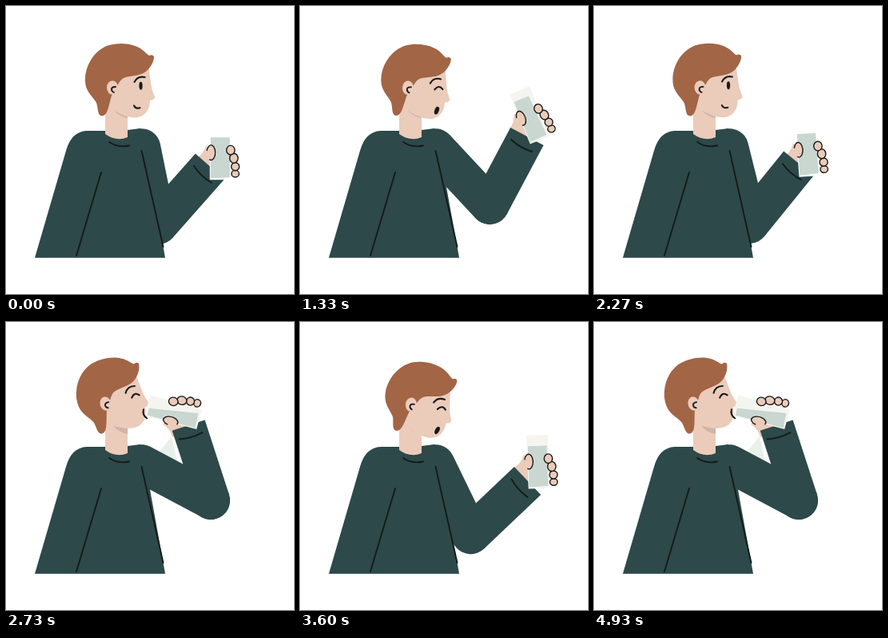
These frames come from a looping animation (360x360 px, 5 s). An HTML page with a canvas:

```html
<!DOCTYPE html>
<html lang="en">
<head>
<meta charset="utf-8">
<title>Drinking a glass of water</title>
<style>
  html, body { margin: 0; width: 100%; height: 100%; overflow: hidden; background: #fff; }
  canvas { display: block; width: 100vmin; height: 100vmin; }
</style>
</head>
<body>
<canvas id="stage"></canvas>
<script>
const canvas = document.getElementById('stage');
const ctx = canvas.getContext('2d');
const SIZE = 360, LOOP = 5000, STEPS = 71, CYCLE = 30;
const SWEATER = '#2d494a', SKIN = '#ebcbba', SHADE = '#cfb4a8', HAIR = '#a26546', INK = '#161a19';
const SHOULDER = { x: 169.5, y: 177 }, NECK = { x: 129, y: 138 };
const UPPER_ARM = 98, FOREARM = 98, FULL_TILT = 75;
const rad = deg => deg * Math.PI / 180;

// step, upper arm, forearm, glass, head (degrees), glass offset along and across the cuff
const KEYS = [
  [0, 11.5, 41.5, 0, 0, -4, 22],
  [2, 14, 39, -4, -0.7, -4, 22],
  [4, 34, 16, -32, -6, -1, 20],
  [6, 55, -10, -66, -12, 2, 18],
  [8, 62, -18, -75, -13.5, 3, 17.6],
  [17, 62, -18, -75, -13.5, 3, 17.6],
  [18, 57, -6, -60, -10, 3, 17.7],
  [19, 43, 28, -22, 3, 3.4, 17.9],
  [20, 33, 44, -4, 9, 3.7, 18],
  [21, 26, 46.5, -2, 9.4, 3.7, 18],
  [24, 14, 45.6, 2, 3, 0, 18.5],
  [27, 11.5, 41.5, 0, 0, -4, 22],
  [30, 11.5, 41.5, 0, 0, -4, 22]
];

function slope(i, c) {
  if (i < 1 || i >= KEYS.length) return 0;
  return (KEYS[i][c] - KEYS[i - 1][c]) / (KEYS[i][0] - KEYS[i - 1][0]);
}

// Monotone cubic tangents: no overshoot between keys
function tangent(i, c) {
  const a = slope(i, c), b = slope(i + 1, c);
  return a * b <= 0 ? 0 : 2 * a * b / (a + b);
}

function sample(step, c) {
  let i = 0;
  while (i < KEYS.length - 2 && step >= KEYS[i + 1][0]) i++;
  const span = KEYS[i + 1][0] - KEYS[i][0];
  const t = (step - KEYS[i][0]) / span, t2 = t * t, t3 = t2 * t;
  return KEYS[i][c] * (2 * t3 - 3 * t2 + 1) + KEYS[i + 1][c] * (3 * t2 - 2 * t3)
    + span * (tangent(i, c) * (t3 - 2 * t2 + t) + tangent(i + 1, c) * (t3 - t2));
}

function fill(path, color) {
  ctx.fillStyle = color;
  ctx.fill(new Path2D(path));
}

function stroke(path, width = 1.9) {
  ctx.strokeStyle = INK;
  ctx.lineWidth = width;
  ctx.lineCap = 'round';
  ctx.stroke(new Path2D(path));
}

function oval(x, y, rx, ry, color, tilt = 0) {
  ctx.beginPath();
  ctx.ellipse(x, y, rx, ry, tilt, 0, Math.PI * 2);
  ctx.fillStyle = color;
  ctx.fill();
}

function within(x, y, deg, draw) {
  ctx.save();
  ctx.translate(x, y);
  ctx.rotate(rad(deg));
  draw();
  ctx.restore();
}

const aboutNeck = (deg, draw) => within(NECK.x, NECK.y, deg, () => {
  ctx.translate(-NECK.x, -NECK.y);
  draw();
});

function drawArm(elbow, forearm, tilt) {
  ctx.beginPath();
  ctx.moveTo(SHOULDER.x, SHOULDER.y);
  ctx.lineTo(elbow.x, elbow.y);
  ctx.strokeStyle = SWEATER;
  ctx.lineWidth = 47.5;
  ctx.lineCap = 'round';
  ctx.stroke();
  within(elbow.x, elbow.y, forearm, () => {
    const left = -23 + 4 * tilt, right = 25.5 - 1.5 * tilt;
    oval(right - 24, 0, 24, 24, SWEATER);
    ctx.fillRect(left, -FOREARM, right - left, FOREARM);
    ctx.translate(0, -FOREARM);
    stroke('M-14 13 Q1 17 16 14');
  });
}

function drawBody() {
  fill('M36 314.7 L75 181 Q81.5 157 101 156 L124 156 L152 155 L168 153 L175 182 L199 314.7 Z', SWEATER);
}

function drawNeck() {
  fill('M124 112 L152 112 L152 164 Q138 170 124 160 Z', SKIN);
  fill('M133 128 Q140 138 152 140 L152 124 Z', SHADE);
  stroke('M129 170 Q140 177.5 154 174.5');
}

function drawFace(eyesShut) {
  fill('M126 92 L178 72 C180 88 181 98 183 106 L186 114 Q186 117 180 118 C180 131 172 140 160 139.5 C148 139 136 132 125 124 Z', SKIN);
  fill('M185 63 Q183 60 179 62 C175 60 172 54 163 50.5 C152 46 138 46 127 49.5 C110 56 99.5 74 99 91 C98.5 107 108 112 113 121 C115.5 128 114 137 120 137.5 C127 137 128 126 132 112 L137 104 C142 95 143 90 152 88.5 C160 87 169 87 176 81 C181 76 185 70 185 63 Z', HAIR);
  oval(133, 102, 7, 8.7, SKIN);
  stroke('M137 101 Q132 101 132 104 Q132 107 135 108', 1.8);
  stroke('M160.5 95 Q164.5 87 173.5 89', 2.1);
  if (eyesShut) stroke('M166.5 102.5 Q171.5 95.5 176.5 101.5', 2.1);
  else oval(168.5, 99.7, 2.1, 5, INK);
}

function drawMouth(mood) {
  if (mood === 'smile') stroke('M160 124.5 Q162 129 167.5 127.3', 2);
  if (mood === 'sip') stroke('M177.5 120 Q174 126 179 132', 2);
  if (mood === 'ah') oval(170.5, 128.5, 2.7, 5, INK, 0.3);
}

function drawWrist() {
  fill('M-18 -42 Q-21 -32 -30 -27 L-26 -4 L0 0 L14 -6 L12 -34 Z', SKIN);
}

function drawGlass(tilt, tinted) {
  fill('M-13.5 -67 L13.5 -67 L13 0 L-13 0 Z', tinted ? '#f5f5f0' : '#fff');
  ctx.beginPath();
  ctx.moveTo(-12, -2);
  ctx.lineTo(-12, -53 - 11 * tilt);
  ctx.lineTo(12 - 15 * tilt, -53 - 11 * tilt);
  ctx.lineTo(12 - 5 * tilt, -3);
  ctx.fillStyle = '#c9d7d0';
  ctx.fill();
}

function outlined(x, y, rx, ry, from = 0, to = Math.PI * 2) {
  oval(x, y, rx, ry, SKIN);
  ctx.beginPath();
  ctx.ellipse(x, y, rx, ry, 0, from, to);
  ctx.strokeStyle = INK;
  ctx.lineWidth = 1.4;
  ctx.stroke();
}

function drawFingers() {
  outlined(-11.5, -34, 5.3, 9.3, Math.PI * 1.1, Math.PI * 2.6);
  outlined(18.8, -7.5, 4.7, 4.3);
  outlined(18.8, -16.5, 5, 5);
  outlined(17, -27, 5.2, 6);
  outlined(13, -37, 5.2, 5.8);
}

function drawScene(step) {
  const [upper, forearm, glass, head, along, across] = [1, 2, 3, 4, 5, 6].map(c => sample(step, c));
  const tilt = Math.max(0, -glass / FULL_TILT);
  const u = rad(upper), f = rad(forearm);
  const elbow = { x: SHOULDER.x + UPPER_ARM * Math.sin(u), y: SHOULDER.y + UPPER_ARM * Math.cos(u) };
  const reach = FOREARM + along;
  const base = {
    x: elbow.x + reach * Math.sin(f) + across * Math.cos(f),
    y: elbow.y - reach * Math.cos(f) + across * Math.sin(f)
  };
  const eyesShut = step >= 5 && step < 23;
  const mood = step >= 19 && step < 23 ? 'ah' : eyesShut ? 'sip' : 'smile';

  ctx.fillStyle = '#fff';
  ctx.fillRect(0, 0, SIZE, SIZE);
  if (tilt > 0.95) fill('M191 163 L207 143 L214 174 Z', '#e9f0e9');
  within(base.x, base.y, glass, drawWrist);
  drawBody();
  drawArm(elbow, forearm, tilt);
  stroke('M119 208 L88 312');
  stroke('M169.5 181 L196.5 301');
  drawNeck();
  aboutNeck(head, () => drawFace(eyesShut));
  within(base.x, base.y, glass, () => {
    drawGlass(tilt, eyesShut);
    drawFingers();
  });
  aboutNeck(head, () => drawMouth(mood));
}

function render(now) {
  const side = Math.round(Math.min(innerWidth, innerHeight) * devicePixelRatio);
  if (canvas.width !== side) canvas.width = canvas.height = side;
  ctx.setTransform(side / SIZE, 0, 0, side / SIZE, 0, 0);
  const frame = Math.floor((now % LOOP + 20) / (LOOP / STEPS));
  drawScene(Math.min(frame, STEPS - 1) % CYCLE);
  requestAnimationFrame(render);
}

render(0);
</script>
</body>
</html>
```
